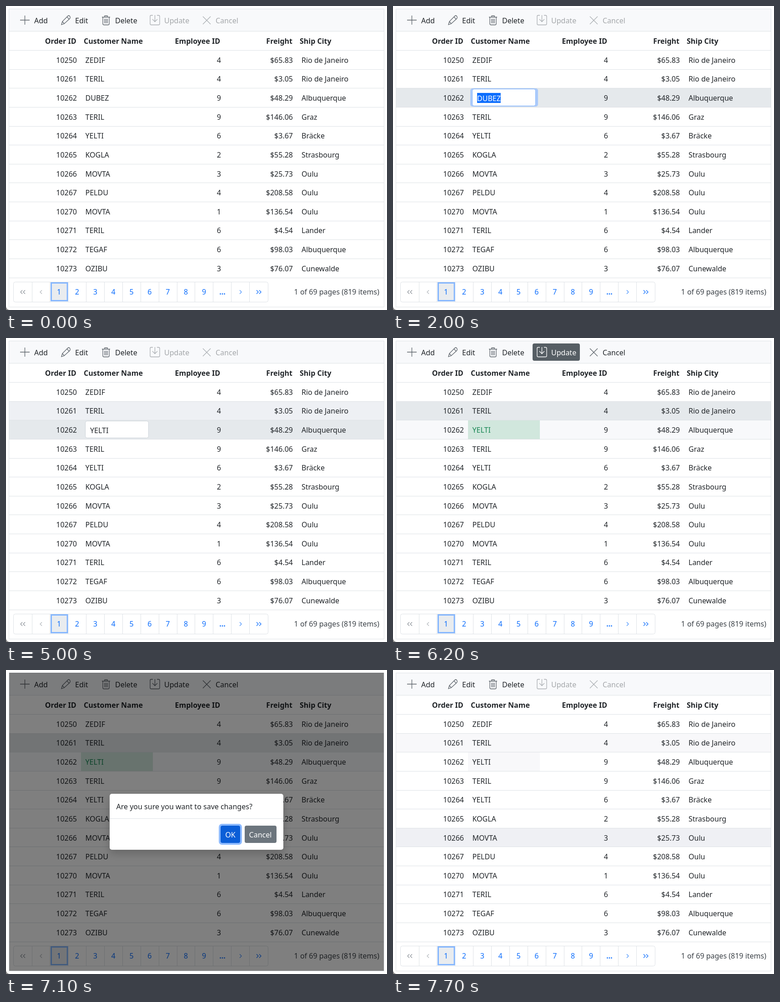
Animation, 838 px wide and 668 px high, one loop 8 s. Source, as an HTML page:

```html
<!DOCTYPE html>
<html lang="en">
<head>
<meta charset="utf-8">
<title>Order grid batch editing</title>
<style>
  html, body { margin: 0; width: 100%; height: 100%; overflow: hidden; background: #fff; }
  svg { display: block; width: 100%; height: 100%; font: 16px "Noto Sans", "Open Sans", sans-serif; }
  text { white-space: pre; }
</style>
</head>
<body>
<svg id="stage" viewBox="0 0 838 668"></svg>
<script>
const LOOP = 8000;
const INK = '#212529', LINE = '#dee2e6', BLUE = '#0d6efd', RING = '#86b7fe';
const OLD_NAME = 'DUBEZ', NEW_NAME = 'YELTI';
const stage = document.getElementById('stage');
const pen = document.createElement('canvas').getContext('2d');
pen.font = '16px "Noto Sans", "Open Sans", sans-serif';

const orders = [
  [10250, 'ZEDIF', 4, '65.83', 'Rio de Janeiro'],
  [10261, 'TERIL', 4, '3.05', 'Rio de Janeiro'],
  [10262, OLD_NAME, 9, '48.29', 'Albuquerque'],
  [10263, 'TERIL', 9, '146.06', 'Graz'],
  [10264, NEW_NAME, 6, '3.67', 'Bräcke'],
  [10265, 'KOGLA', 2, '55.28', 'Strasbourg'],
  [10266, 'MOVTA', 3, '25.73', 'Oulu'],
  [10267, 'PELDU', 4, '208.58', 'Oulu'],
  [10270, 'MOVTA', 1, '136.54', 'Oulu'],
  [10271, 'TERIL', 6, '4.54', 'Lander'],
  [10272, 'TEGAF', 6, '98.03', 'Albuquerque'],
  [10273, 'OZIBU', 3, '76.07', 'Cunewalde']
];

const rect = (x, y, w, h, fill, more = '') =>
  `<rect x="${x}" y="${y}" width="${w}" height="${h}" fill="${fill}" ${more}/>`;
const text = (x, y, s, fill = INK, more = '') =>
  `<text x="${x}" y="${y}" fill="${fill}" ${more}>${s}</text>`;
const path = (d, color, width = 1.3) =>
  `<path d="${d}" fill="none" stroke="${color}" stroke-width="${width}"/>`;
const group = (opacity, s) => `<g opacity="${opacity}">${s}</g>`;
const END = 'text-anchor="end"', MID = 'text-anchor="middle"', BOLD = 'font-weight="600"';

const ROW = 41.65;
const rowLine = i => Math.floor(97.4 + i * ROW);
const within = (t, a, b) => t >= a && t < b;
const ramp = (t, a, b) => Math.min(1, Math.max(0, (t - a) / (b - a)));

function toolbar(t) {
  const active = within(t, 5200, 7600);
  const hover = t < 6400 ? ramp(t, 5400, 5600) : 0;
  const gray = '#5c636a', dim = active ? gray : '#abafb3';
  const label = active ? INK : '#a4a7aa';
  const lit = hover > .4;
  const save = lit ? '#fff' : dim;
  return rect(7, 6, 824, 49, '#f8f9fb') +
    rect(307, 12, 104, 38, t >= 5900 ? '#565e64' : '#5c636a', `rx="4" opacity="${hover}"`) +
    path('M31 31H52M41.5 21V41', gray) +
    path('M122 41L124 34L136 22Q138 20 140 22L141 24Q142 26 140 28L128 39ZM134 24L139 29M124 34L128 39', gray) +
    path('M211 24.5H229M217 24V21.5H223V24M213 25V39Q213 41.5 215.5 41.5H224.5Q227 41.5 227 39V25M217 28V38M220 28V38M223 28V38', gray) +
    path('M323 20.5H319Q317 20.5 317 23V39Q317 41.5 319.5 41.5H335.5Q338 41.5 338 39V23Q338 20.5 335.5 20.5H332M327.5 20V34M322 29L327.5 34.5L333 29', save) +
    path('M433 23L450 40M450 23L433 40', dim) +
    text(62, 38, 'Add') + text(152, 38, 'Edit') + text(240, 38, 'Delete') +
    text(348, 38, 'Update', lit ? '#fff' : label) + text(461, 38, 'Cancel', label);
}

function rowFill(i, t) {
  if (i === 1) {
    if (t >= 7700) return '#f8f8fa';
    if (t >= 5200) return '#e5e9ec';
    if (t >= 5000) return '#eef0f4';
  }
  if (i === 2) {
    if (within(t, 1000, 5200)) return '#e5e9ec';
    if (within(t, 5200, 7600)) return '#f8f9fb';
  }
  if (i === 6 && t >= 7700) return '#eff0f4';
  return '#fff';
}

function grid(t) {
  const head = (x, s, more = '') => text(x, 83, s, INK, `${BOLD} ${more}`);
  let s = head(154.5, 'Order ID', END) + head(171, 'Customer Name') +
    head(471, 'Employee ID', END) + head(630, 'Freight', END) + head(646, 'Ship City');
  orders.forEach(([id, name, staff, cost, city], i) => {
    const y = rowLine(i) + 1, base = Math.round(124.6 + i * ROW);
    const edited = i === 2 && t >= 5200;
    const saved = t >= 7600;
    s += rect(7, y, 824, rowLine(i + 1) - y, rowFill(i, t));
    if (edited) s += rect(165, y, 158, 41, saved ? '#f8f8fa' : '#d1e7dd');
    s += text(156, base, id, INK, END) +
      (i === 2 && within(t, 1200, 5200) ? '' :
        text(174.5, base, edited ? NEW_NAME : name, edited && !saved ? '#198754' : INK)) +
      text(473, base, staff, INK, END) +
      text(631, base, '$' + cost, INK, END) + text(650, base, city);
  });
  for (let i = 0; i <= 12; i++) s += rect(7, rowLine(i), 824, 1, LINE);
  return s + rect(7, 55, 824, 1, LINE);
}

function focusCell(x, y) {
  return rect(x + 1.5, y + 1.5, 156, 37, 'none', `stroke="${RING}" stroke-width="3"`);
}

function pager() {
  const step = 39.87;
  let s = rect(16.5, 606.5, 560, 44, '#fff', `rx="4" stroke="${LINE}"`);
  for (let i = 1; i < 14; i++) s += rect(Math.floor(17.2 + i * step), 607, 1, 43, LINE);
  s += rect(99.5, 608.5, 35.5, 39, '#e9ecef', `stroke="${RING}" stroke-width="3"`);
  for (let i = 1; i < 10; i++) s += text(76.7 + i * step, 634, i, BLUE, MID);
  const chevron = (x, dir, color) =>
    path(`M${x - 2 * dir} 624.5L${x + 2 * dir} 628.5L${x - 2 * dir} 632.5`, color, 1.2);
  return s + text(476, 634, '...', BLUE, MID + ' font-weight="700"') +
    chevron(34, -1, '#8c9299') + chevron(40, -1, '#8c9299') + chevron(77, -1, '#b3b8bd') +
    chevron(516, 1, '#4a93fd') + chevron(553, 1, BLUE) + chevron(559, 1, BLUE) +
    text(821, 634, '1 of 69 pages (819 items)', '#3c4248', END);
}

function typed(t) {
  if (t < 2500) return OLD_NAME;
  const count = [2500, 2700, 3500, 3700, 3800].filter(at => t >= at).length;
  return NEW_NAME.slice(0, count);
}

function editor(t) {
  const focus = t < 5000, value = typed(t);
  const width = pen.measureText(value).width;
  const marked = within(t, 2000, 2500);
  const caret = [[1200, 1700], [2500, 2700], [3700, 4300], [4800, 5000]].some(([a, b]) => within(t, a, b));
  return (focus ? rect(170, 181, 149, 40, '#abcafa', 'rx="5"') : '') +
    rect(174.5, 182.5, 139, 37, '#fff', `rx="4" stroke="${focus ? RING : '#ced4da'}"`) +
    (marked ? rect(185, 191, width, 22, BLUE) : '') +
    text(185, 209, value, marked ? '#fff' : INK) +
    (caret ? rect(Math.floor(185 + width), 191, 1, 22, '#000') : '');
}

function suggestions(t) {
  const fade = t < 3900 ? ramp(t, 2500, 2700) : 1 - ramp(t, 3800, 4000);
  const both = t < 3700, bottom = both ? 385 : 332;
  const item = (y, s) => text(231, y, s, '#111', 'font-size="20"');
  return group(fade,
    `<path d="M224 220H230L243 209.5L256 220H668Q680 220 680 232V${bottom - 12}Q680 ${bottom} 668 ${bottom}H224Q212 ${bottom} 212 ${bottom - 12}V232Q212 220 224 220Z" fill="#fff" filter="url(#soft)"/>` +
    text(230, 257, 'Saved info', '#707070', BOLD + ' font-size="17"') +
    path('M643.5 244.5L654.5 255.5M654.5 244.5L643.5 255.5', '#111', 1.5) +
    item(307, NEW_NAME) + (both ? item(359, 'YADOMfghjk') : ''));
}

function dialog(t) {
  const fade = t < 7600 ? ramp(t, 6300, 6600) : 1 - ramp(t, 7500, 7700);
  return group(fade, rect(7, 6, 824, 655, '#000', 'opacity=".5"') +
    rect(228, 272, 382, 123, '#fff', 'rx="5" filter="url(#deep)"') +
    text(242.5, 306, 'Are you sure you want to save changes?') +
    rect(228, 326, 382, 1, LINE) +
    rect(468, 338, 51, 46, '#8dbafe', 'rx="7"') +
    rect(472, 342, 43, 38, t >= 7100 ? '#0b5ed7' : BLUE, 'rx="4"') +
    rect(525, 342, 70, 38, '#6c757d', 'rx="4"') +
    text(493.5, 368, 'OK', '#fff', MID) + text(559.5, 368, 'Cancel', '#fff', MID));
}

function scene(t) {
  return `<defs>
    <filter id="soft" x="-10%" y="-20%" width="120%" height="150%"><feDropShadow dx="0" dy="2" stdDeviation="3" flood-opacity=".35"/></filter>
    <filter id="deep" x="-20%" y="-40%" width="140%" height="200%"><feDropShadow dx="0" dy="8" stdDeviation="9" flood-opacity=".2"/></filter>
    </defs>` +
    rect(0, 0, 838, 668, '#fff') + '<path d="M0 660Q1 667 8 668H0Z" fill="#858585"/>' +
    toolbar(t) + grid(t) + pager() +
    rect(6.5, 6.5, 825, 655, 'none', `stroke="${LINE}"`) +
    (within(t, 1000, 1200) ? focusCell(165, 181) : '') +
    (within(t, 5200, 6200) ? focusCell(323, 140) : '') +
    (within(t, 1200, 5200) ? editor(t) : '') +
    (within(t, 2600, 4000) ? suggestions(t) : '') +
    (within(t, 6400, 7700) ? dialog(t) : '');
}

let shown = -1;
function play(now) {
  const t = Math.floor(now % LOOP / 100) * 100;
  if (t !== shown) stage.innerHTML = scene(shown = t);
  requestAnimationFrame(play);
}
play(performance.now());
</script>
</body>
</html>
```
